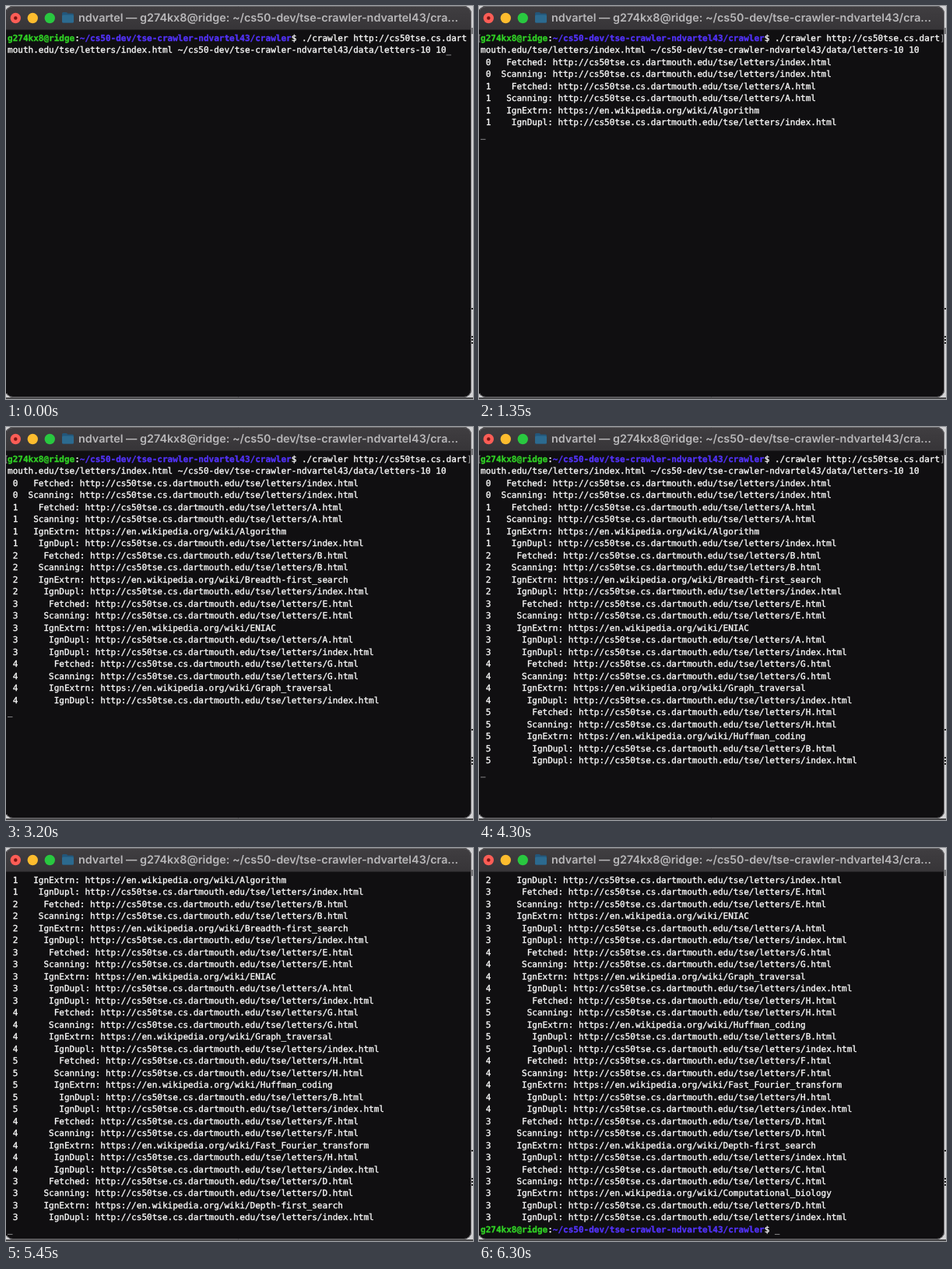
Write an HTML page with a canvas that moves like this. It is 600 px wide and 505 px high and loops after 8150 ms.

```html
<!DOCTYPE html>
<html lang="en">
<head>
<meta charset="utf-8">
<title>Crawler run</title>
<style>
  html, body { margin: 0; width: 100%; height: 100%; overflow: hidden; background: #d2d2d4; }
  canvas { display: block; }
</style>
</head>
<body>
<canvas id="stage" width="600" height="505"></canvas>
<script>
const ctx = document.getElementById('stage').getContext('2d');
const LOOP = 8150, ENTER = 50, FIRST = 550, EVERY = 650;
const COL = 6.63, ROW = 15.48, LEFT = 2, BASE = 45, LAST_ROW = 29, COLS = 89;
const MONO = '"DejaVu Sans Mono", "Liberation Mono", monospace';
const WHITE = '#fafafa', GREEN = '#30cf25', BLUE = '#5232f8';

const user = 'ndvartel', host = 'g274kx8@ridge';
const repo = `~/cs50-dev/tse-crawler-${user}43`;
const site = 'http://cs50tse.cs.dartmouth.edu/tse/letters/';
const title = `${user} — ${host}: ${repo}/cra...`;
const prompt = [[host, GREEN, 1], [':', WHITE], [repo + '/crawler', BLUE, 1], ['$ ', WHITE]];
const promptCols = prompt.reduce((n, [s]) => n + s.length, 0);
const command = `./crawler ${site}index.html ${repo}/data/letters-10 10`;
const split = COLS - promptCols;

// depth, page, external article, duplicate links
const pages = [
  [0, 'index'],
  [1, 'A', 'Algorithm', 'index'],
  [2, 'B', 'Breadth-first_search', 'index'],
  [3, 'E', 'ENIAC', 'A', 'index'],
  [4, 'G', 'Graph_traversal', 'index'],
  [5, 'H', 'Huffman_coding', 'B', 'index'],
  [4, 'F', 'Fast_Fourier_transform', 'H', 'index'],
  [3, 'D', 'Depth-first_search', 'index'],
  [3, 'C', 'Computational_biology', 'D', 'index']
];

const rows = [
  { at: 0, runs: [...prompt, [command.slice(0, split), WHITE]], marked: true },
  { at: 0, runs: [[command.slice(split), WHITE]] }
];

pages.forEach(([depth, page, article, ...dups], i) => {
  const log = (label, url) => rows.push({
    at: FIRST + i * EVERY,
    runs: [[' ' + depth + label.padStart(10 + depth) + ': ' + url, WHITE]]
  });
  const link = name => site + name + '.html';
  log('Fetched', link(page));
  log('Scanning', link(page));
  if (article) log('IgnExtrn', 'https://en.wikipedia.org/wiki/' + article);
  dups.forEach(d => log('IgnDupl', link(d)));
});
rows.push({ at: FIRST + (pages.length - 1) * EVERY, runs: prompt, open: true });

function rect(x, y, w, h, fill) {
  ctx.fillStyle = fill;
  ctx.fillRect(x, y, w, h);
}

function disc(x, y, r, fill) {
  ctx.fillStyle = fill;
  ctx.beginPath();
  ctx.arc(x, y, r, 0, 7);
  ctx.fill();
}

function box(x, y, w, h, r) {
  ctx.beginPath();
  ctx.roundRect(x, y, w, h, r);
}

// Each glyph sits in its own terminal cell; a hairline stroke adds weight.
function drawRuns(runs, y) {
  let col = 0;
  ctx.lineWidth = 0.35;
  for (const [text, color, bold] of runs) {
    ctx.font = (bold ? 'bold ' : '') + '11px ' + MONO;
    ctx.fillStyle = ctx.strokeStyle = color;
    for (const ch of text) {
      if (ch !== ' ') {
        ctx.fillText(ch, LEFT + col * COL, y);
        ctx.strokeText(ch, LEFT + col * COL, y);
      }
      col++;
    }
  }
}

function drawWindow() {
  rect(0, 0, 600, 505, '#d2d2d4');
  rect(0, 503, 600, 2, '#48484a');
  rect(598, 28, 2, 8, '#77777a');
  rect(598, 388, 2, 2, '#222');
  for (let y = 424; y < 436; y += 4) rect(598, y, 2, 2, '#222');

  box(-1, 0, 599, 503, 10);
  ctx.save();
  ctx.clip();
  rect(0, 0, 598, 503, '#100f11');
  const bar = ctx.createLinearGradient(0, 0, 0, 30);
  bar.addColorStop(0, '#403e41');
  bar.addColorStop(1, '#373538');
  rect(0, 0, 598, 30.5, bar);
  ctx.restore();
  box(-0.5, 0.5, 598, 502, 9.5);
  ctx.strokeStyle = '#69686b';
  ctx.lineWidth = 1;
  ctx.save();
  ctx.beginPath();
  ctx.rect(1, 0, 599, 505);
  ctx.clip();
  box(-0.5, 0.5, 598, 502, 9.5);
  ctx.stroke();
  ctx.restore();

  disc(12.3, 15.5, 6.7, '#fc5d56');
  disc(12.3, 15.5, 2.2, '#7c1512');
  disc(34.3, 15.5, 6.7, '#fdbc2e');
  disc(56.3, 15.5, 6.7, '#29c840');

  ctx.fillStyle = '#22567a';
  box(72, 8, 7, 5, 1.5);
  ctx.fill();
  box(72, 9.5, 15, 12, 1.5);
  ctx.fill();
  ctx.fillStyle = '#2c6a8f';
  box(72, 11.5, 15, 10, 1.5);
  ctx.fill();

  ctx.font = '600 14.35px Inter, "Open Sans", sans-serif';
  ctx.fillStyle = '#b9b8ba';
  ctx.fillText(title, 93, 20);
}

function draw(t) {
  drawWindow();
  const shown = rows.filter(r => t >= r.at);
  const last = shown[shown.length - 1];
  const entered = t >= ENTER;
  const curRow = entered && !last.open ? shown.length : shown.length - 1;
  const curCol = last.open ? promptCols : entered ? 0 : command.length - split;
  const top = Math.max(0, curRow - LAST_ROW);

  shown.slice(top).forEach((r, i) => {
    const y = BASE + i * ROW;
    drawRuns(r.runs, y);
    if (r.marked && entered) {
      ctx.font = '11px ' + MONO;
      ctx.fillStyle = '#a5a5a7';
      ctx.fillText('[', -3, y);
      ctx.fillText(']', LEFT + COLS * COL, y);
    }
  });
  rect(LEFT + curCol * COL, BASE + (curRow - top) * ROW + 2, 6.5, 1, '#848486');
}

ctx.textRendering = 'geometricPrecision';
ctx.lineJoin = 'round';
const start = performance.now();
function tick() {
  draw((performance.now() - start) % LOOP);
  requestAnimationFrame(tick);
}
tick();
</script>
</body>
</html>
```
